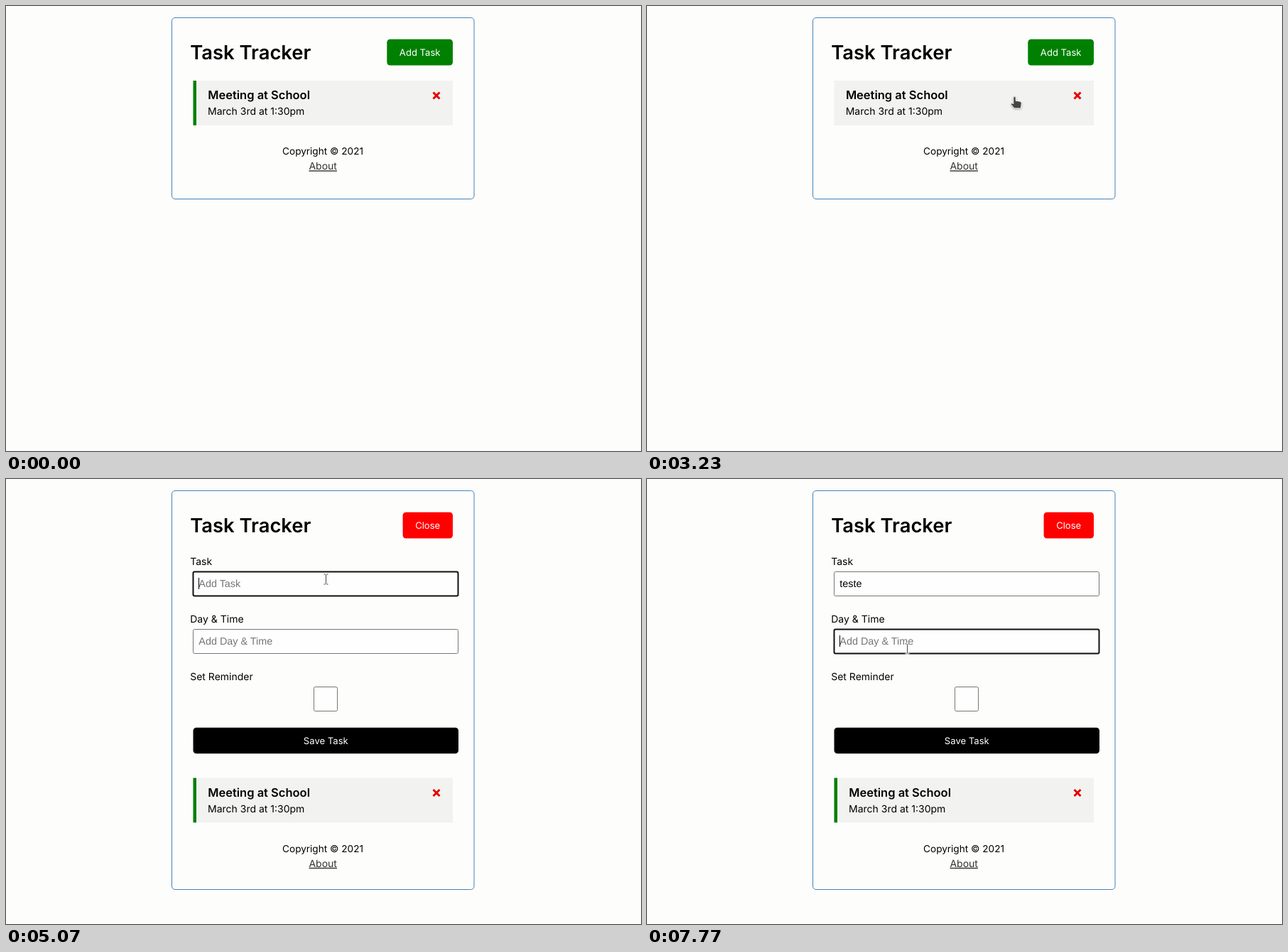
Animation of 894 by 626 pixels, one loop 8 s. Source, as an HTML page:

```html
<!DOCTYPE html>
<html lang="en">
<head>
<meta charset="utf-8">
<title>Task list</title>
<style>
  html, body { margin: 0; width: 100%; height: 100%; overflow: hidden; background: #fdfdfc; }
  svg { display: block; width: 894px; height: 626px; }
  text { font: 14px Inter, "Open Sans", sans-serif; fill: #000; text-rendering: geometricPrecision; white-space: pre; }
  .title { font-size: 27.4px; font-weight: 600; }
  .name { font-size: 16.5px; font-weight: 600; }
  .mid { text-anchor: middle; }
  .small { font-size: 13.6px; }
  .btn { font-size: 13.1px; fill: #fff; text-anchor: middle; }
  .link { fill: #333; text-decoration: underline; }
  .field { font: 14.4px "Liberation Sans", Arial, sans-serif; }
  .hint { fill: #757575; }
  .box { fill: #fefefe; stroke: #767676; }
  .focus .box { stroke: #101010; stroke-width: 2; }
  .pointer { fill: #444; stroke: #fff; stroke-linejoin: round; filter: drop-shadow(0 1px 1px #0005); }
  #cursor { pointer-events: none; }
</style>
</head>
<body>
<svg viewBox="0 0 894 626">
  <rect id="card" x="233.5" y="16.5" width="425.5" height="255" rx="4.5" fill="none" stroke="#4682b4"/>
  <text class="title" x="259.2" y="75">Task Tracker</text>

  <g id="addButton" data-cursor="hand">
    <rect x="536.3" y="46.8" width="92.7" height="36.7" rx="4.5" fill="#008000"/>
    <text class="btn" x="582.7" y="70">Add Task</text>
  </g>

  <g id="form">
    <g data-cursor="hand">
      <rect x="558.6" y="46.8" width="70.4" height="36.7" rx="4.5" fill="#f00"/>
      <text class="btn" x="593.7" y="70">Close</text>
    </g>
    <text x="259.2" y="120.5">Task</text>
    <g id="taskField" data-cursor="beam">
      <rect class="box" x="263.5" y="130.5" width="373" height="34" rx="2"/>
      <text id="taskText" class="field" x="271.3" y="152"></text>
    </g>
    <text x="259.2" y="201.5">Day &amp; Time</text>
    <g id="dayField" data-cursor="beam">
      <rect class="box" x="263.5" y="211.5" width="373" height="34" rx="2"/>
      <text class="field hint" x="271.3" y="233">Add Day &amp; Time</text>
    </g>
    <text x="259.2" y="282.5">Set Reminder</text>
    <rect class="box" x="433.5" y="292.5" width="33" height="34" rx="2"/>
    <rect x="263.5" y="349.8" width="373.5" height="36.5" rx="4.5"/>
    <text class="btn" x="450.3" y="373.3">Save Task</text>
    <rect id="caret" width="1" height="16"/>
  </g>

  <g id="list">
    <g data-cursor="hand">
      <rect x="263.5" y="105" width="365.5" height="62.8" fill="#f2f2f1"/>
      <rect id="bar" x="263.5" y="105" width="4.5" height="62.8" fill="#008000"/>
      <g id="label">
        <text class="name" x="284.2" y="131">Meeting at School</text>
        <text x="284" y="153.3">March 3rd at 1:30pm</text>
      </g>
      <path d="M601.5 121.5l9 9m0-9l-9 9" stroke="#e60000" stroke-width="3"/>
    </g>
    <text class="mid small" x="446" y="209">Copyright © 2021</text>
    <text class="mid link" x="446.2" y="230.3" data-cursor="hand">About</text>
  </g>

  <g id="cursor">
    <path id="arrow" class="pointer" d="M0 0V15L3.5 12L6 17.5L8.5 16.4L6 11H11Z"/>
    <path id="hand" class="pointer" transform="translate(-1 .3) scale(.95)"
      d="M-1.8 1.3Q0 -1.2 1.8 1.3V6.2L8 7.2Q10.5 7.8 10.3 10L9.3 17.5H-.5L-5.4 11.6Q-5.6 9.6 -3.6 9.8L-1.8 11Z"/>
    <g id="beam" fill="none">
      <path d="M-3 -7H3M0 -7V7M-3 7H3" stroke="#fff" stroke-width="2.5"/>
      <path d="M-3 -7H-.8M.8 -7H3M0 -6.5V6.5M-3 7H-.8M.8 7H3" stroke="#444"/>
    </g>
  </g>
</svg>
<script>
const LOOP = 8000, FORM_SHIFT = 315.5;
const ENTER = 30, WANDER_END = 1700;
const TOGGLE_OFF = 2400, TOGGLE_ON = 3530, OPEN = 4370;
const FOCUS_TASK = 4960, FOCUS_DAY = 7700;
const WORD = "teste", TYPE_START = 5300, KEY_GAP = 150;

// Pointer moves after the opening sweep; each starts where the last one stopped
const MOVES = [
  { from: 1700, to: 2070, x: 515, y: 127 },
  { from: 2370, to: 2870, x: 512, y: 154 },
  { from: 3070, to: 3230, x: 518, y: 127 },
  { from: 3530, to: 4170, x: 574, y: 63 },
  { from: 4400, to: 5070, x: 450, y: 141 },
  { from: 5200, to: 6430, x: 422, y: 152 },
  { from: 7230, to: 7700, x: 366, y: 239 }
];

const $ = id => document.getElementById(id);
const show = (id, on) => $(id).style.display = on ? "" : "none";
const clamp = (v, lo, hi) => Math.min(hi, Math.max(lo, v));

// Two shrinking loops around the card, dropping in from the top edge
function wander(t) {
  const u = clamp((t - ENTER) / (WANDER_END - ENTER), 0, 1);
  const angle = u * (4 * Math.PI - 1), size = 1 - .3 * u;
  return {
    x: 446 + 200 * size * Math.sin(angle),
    y: 165 - 100 * size * Math.cos(angle) - 90 * (1 - u) ** 6
  };
}

function pointerAt(t) {
  let { x, y } = wander(t);
  for (const move of MOVES) {
    const u = clamp((t - move.from) / (move.to - move.from), 0, 1);
    const ease = u * (2 - u);
    x += (move.x - x) * ease;
    y += (move.y - y) * ease;
  }
  return [Math.round(x), Math.round(y)];
}

function drawPointer(t) {
  const [x, y] = pointerAt(t);
  const area = document.elementFromPoint(x, y)?.closest("[data-cursor]");
  const kind = area ? area.dataset.cursor : "arrow";
  for (const id of ["arrow", "hand", "beam"]) show(id, id === kind);
  show("cursor", t >= ENTER);
  $("cursor").setAttribute("transform", `translate(${x + .5} ${y})`);
}

function drawForm(t) {
  const onDay = t >= FOCUS_DAY, onTask = t >= FOCUS_TASK && !onDay;
  $("taskField").classList.toggle("focus", onTask);
  $("dayField").classList.toggle("focus", onDay);

  const count = clamp(Math.floor((t - TYPE_START) / KEY_GAP) + 1, 0, WORD.length);
  const field = $("taskText");
  field.textContent = count ? WORD.slice(0, count) : "Add Task";
  field.classList.toggle("hint", !count);

  // The caret restarts its blink at each key press or focus
  const lastKey = TYPE_START + (count - 1) * KEY_GAP;
  const since = onDay ? FOCUS_DAY : count ? lastKey : FOCUS_TASK;
  show("caret", (onTask || onDay) && (t - since) % 1120 < 520);
  const end = count && !onDay ? field.getComputedTextLength() : 0;
  $("caret").setAttribute("x", 271 + Math.round(end));
  $("caret").setAttribute("y", onDay ? 220 : 139);
}

function draw(t) {
  const open = t >= OPEN, marked = t < TOGGLE_OFF || t >= TOGGLE_ON;
  show("form", open);
  show("addButton", !open);
  $("card").setAttribute("height", open ? 561 : 255);
  $("list").setAttribute("transform", `translate(0 ${open ? FORM_SHIFT : 0})`);
  show("bar", marked);
  $("label").setAttribute("transform", `translate(${marked ? 0 : -4.3} 0)`);
  if (open) drawForm(t);
  drawPointer(t);
}

const start = performance.now();
function tick() {
  draw((performance.now() - start) % LOOP);
  requestAnimationFrame(tick);
}
tick();
</script>
</body>
</html>
```
